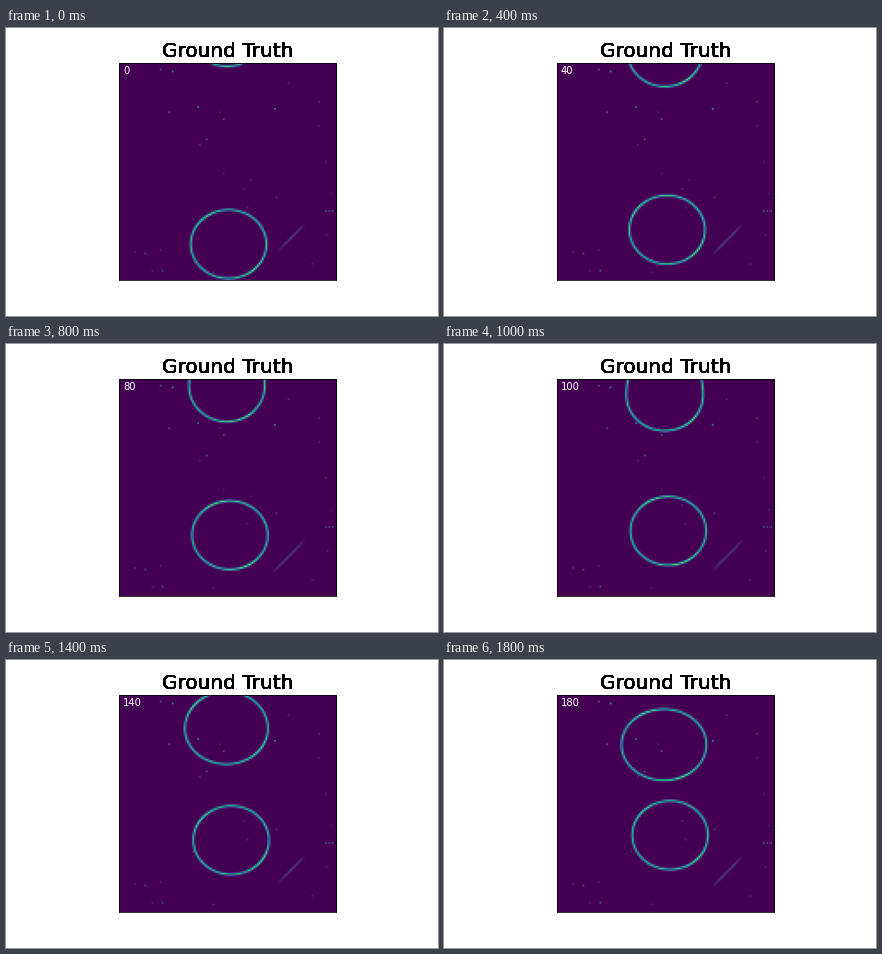
A matplotlib script that plays this animation: 432 by 288 pixels, repeating every 2 s.

```python
import numpy as np
import matplotlib.pyplot as plt
from matplotlib.animation import FuncAnimation

W, H, DPI = 432, 288, 72
FRAMES, INTERVAL = 10, 200
LEFT, RIGHT, TOP, BOTTOM = 112.68, 330.12, 34.56, 252.0
CELLS = 128
STEP = (RIGHT - LEFT) / CELLS

# Cell centres in stage pixels
axis = (np.arange(CELLS) + 0.5) * STEP
X, Y = np.meshgrid(LEFT + axis, TOP + axis)

# The specks that stand out; the rest are scattered at random
SPECKS = [(165, 44), (192, 79), (268, 81), (162, 84), (217, 91), (153, 41),
          (200, 111), (139, 225), (156, 242), (318, 183), (322, 183), (326, 183)]


def make_noise():
    rng = np.random.default_rng(4)
    img = np.zeros((CELLS, CELLS))
    rows, cols = rng.integers(2, CELLS - 2, (2, 20))
    img[rows, cols] = rng.uniform(0.07, 0.15, 20)
    for k, (x, y) in enumerate(SPECKS):
        row, col = int((y + 0.5 - TOP) / STEP), int((x + 0.5 - LEFT) / STEP)
        img[row, col] = 0.42 if k < 3 else 0.24
    return img


def scratch(i):
    start, end = 268 + 3 * np.cos(0.9 * i), 299
    dist = (X + Y - 494.5) / np.sqrt(2)
    fade = np.clip(np.minimum(X - start, end - X) / 8, 0, 1)
    return 0.27 * np.exp(-(dist / 0.7) ** 2) * fade


def ring(cx, cy, rx, ry_up, ry_down, drift):
    dx, dy = X - cx, Y - cy
    ry = np.where(dy < 0, ry_up, ry_down)
    r = np.hypot(dx / rx, dy / ry) + 1e-9
    slope = np.hypot(dx / rx ** 2, dy / ry ** 2) / r + 1e-9
    dist = (r - 1) / slope
    angle = np.arctan2(dy / ry, dx / rx)
    glow = np.clip(np.cos(2 * angle - 1.7 + drift), 0, 1) ** 4
    return (0.72 + 0.2 * glow) * np.exp(-(dist / 0.95) ** 2)


def ease(i, middle, rate):
    return 1 / (1 + np.exp(-rate * (i - middle)))


def lower_ball(i):
    cx = 222 + 0.27 * i + 0.013 * i * i
    cy = 161.2 + 55 * 0.86 ** i
    return ring(cx, cy, 37.7, 34.2, 34.2, 0.5 * np.sin(i))


def upper_ball(i):
    """Drops in from above, its top closing as it enters."""
    base = 38.8 + 10.4 * i - 0.145 * i * i
    rx = 37.6 + 4.8 * ease(i, 6.2, 1.6)
    ry_up = 60 - 24.6 * ease(i, 5.6, 2)
    cx = 220.5 - 0.014 * i * i
    return ring(cx, base - 35.5, rx, ry_up, 35.5, 0.5 * np.cos(i))


NOISE = make_noise()


def scene(i):
    return np.maximum.reduce([NOISE, scratch(i), lower_ball(i), upper_ball(i)])


plt.rcParams["font.family"] = "DejaVu Sans"
fig, ax = plt.subplots(figsize=(W / DPI, H / DPI), dpi=DPI, facecolor="white")
fig.subplots_adjust(left=0.125, right=0.9, bottom=0.125, top=0.88)
ax.set_xticks([])
ax.set_yticks([])
image = ax.imshow(scene(0), cmap="viridis", vmin=0, vmax=1,
                  extent=(LEFT, RIGHT, BOTTOM, TOP))
label = ax.text(117, 46.4, "0", color="white", fontsize=10)

# Stacked copies give the title its heavy edges
for _ in range(10):
    fig.text((LEFT + RIGHT) / 2 / W, 1 - (TOP - 6) / H, "Ground Truth",
             fontsize=20, ha="center", va="baseline")


def update(i):
    image.set_data(scene(i))
    label.set_text(str(20 * i))
    return image, label


anim = FuncAnimation(fig, update, frames=FRAMES, interval=INTERVAL,
                     repeat=True, repeat_delay=0, blit=False)
plt.show()
```
